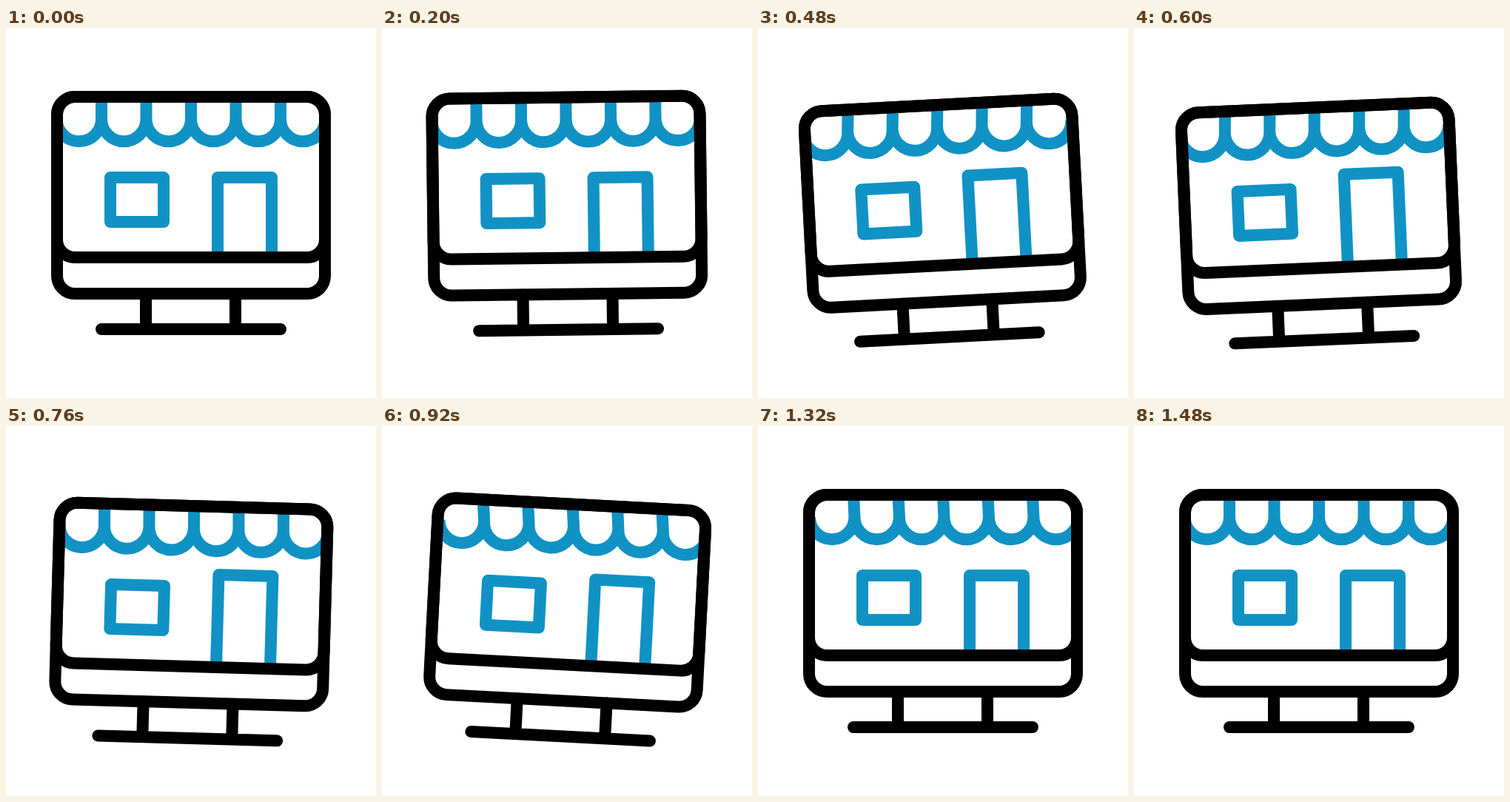
Animation of 500x500 px, one loop 1.64 s. Source, as an HTML page:

```html
<!DOCTYPE html>
<html lang="en">
<head>
<meta charset="utf-8">
<title>Online shop</title>
<style>
  html, body { margin: 0; width: 100%; height: 100%; overflow: hidden; background: #fff; }
  svg { display: block; width: 100%; height: 100%; }
  g { fill: none; stroke-width: 16; stroke-linejoin: round; }
  .shop { stroke: #1092c5; }
  .monitor { stroke: #000; stroke-linecap: round; }
</style>
</head>
<body>
<svg viewBox="0 0 500 500">
  <clipPath id="screen"><rect x="69" y="93" width="362" height="217" rx="24"/></clipPath>
  <g id="scene">
    <g class="shop" clip-path="url(#screen)">
      <path id="awning"/>
      <rect x="141" y="202" width="72" height="60"/>
      <path id="door"/>
    </g>
    <g class="monitor">
      <rect x="69" y="93" width="362" height="266" rx="24"/>
      <rect x="69" y="93" width="362" height="217" rx="24"/>
      <path d="M189 359V407M310 359V407M129 407H371"/>
    </g>
  </g>
</svg>
<script>
  const LOOP = 1640, STEP = 40;
  const [scene, awning, door] = ['scene', 'awning', 'door'].map(id => document.getElementById(id));

  // Eased rise from 0 to 1 between two times in ms
  function ramp(t, from, to) {
    const u = Math.min(1, Math.max(0, (t - from) / (to - from)));
    return u * u * (3 - 2 * u);
  }

  const tilt = t => 3 * (2 * ramp(t, 540, 860) - ramp(t, 95, 430) - ramp(t, 985, 1325));
  const drop = t => 15 * (ramp(t, 130, 670) - ramp(t, 780, 1320));
  const lift = t => 17 * (ramp(t, 290, 600) - ramp(t, 770, 1080));
  const sway = t => 6 * ramp(t, 480, 1080) - 2 * ramp(t, 240, 480) - 4 * ramp(t, 1080, 1480);

  // Six scallops on five poles; the pole tops stay fixed while the arcs sway
  function awningPath(shift) {
    const count = 6, w = 60.5, r = w / 2;
    let d = '';
    for (let i = 0; i < count; i++) {
      const x = 68.5 + w * i;
      d += i ? `M${x} 93L${x + shift} 123` : `M${x + shift} 123`;
      d += `a${r} ${r} 0 0 0 ${w} 0`;
      if (i < count - 1) d += `L${x + w} 93`;
    }
    return d;
  }

  function draw(now) {
    const t = Math.floor((now % LOOP) / STEP) * STEP;
    scene.setAttribute('transform', `translate(0 ${drop(t)}) rotate(${tilt(t)} 250 238)`);
    awning.setAttribute('d', awningPath(sway(t)));
    door.setAttribute('d', `M286 310V${202 - lift(t)}H359V310`);
  }

  function tick() {
    draw(performance.now());
    requestAnimationFrame(tick);
  }
  tick();
</script>
</body>
</html>
```
